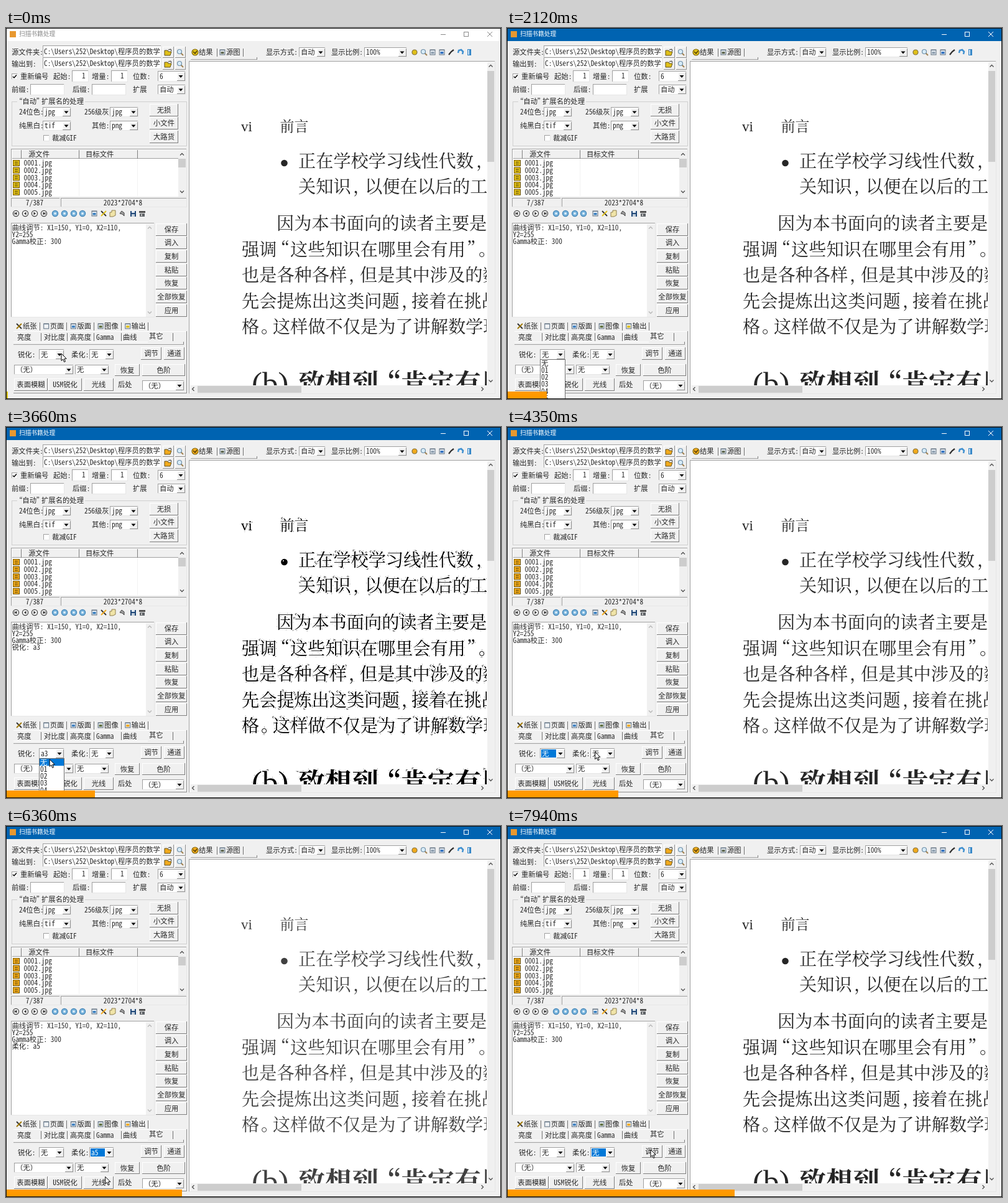
These frames come from a looping animation (796 px wide and 596 px high, 8000 ms). An HTML page with a canvas:

```html
<!DOCTYPE html>
<html lang="zh">
<head>
<meta charset="utf-8">
<style>
html, body { margin: 0; width: 100%; height: 100%; overflow: hidden; background: #f0f0f0; }
canvas { display: block; }
</style>
</head>
<body>
<canvas id="stage" width="796" height="596"></canvas>
<script>
const c = document.getElementById('stage').getContext('2d');
const UI = '"Noto Sans Mono CJK SC", "Noto Sans CJK SC", "Noto Sans CJK", monospace';
const BOOK = '"Noto Serif CJK SC", "Noto Sans CJK SC", "Noto Sans CJK", serif';
const LATIN = '"Liberation Serif", serif';
const LOOP = 8000, STEP = 69.4, ROW = 11.2, LIST_Y = 533;
const BLUE = '#0078d7', INK = '#262626';

// ---- primitives ----
function box(x, y, x2, y2, fill) {
  c.fillStyle = fill;
  c.fillRect(x, y, x2 - x, y2 - y);
}
// y is the vertical middle of the glyphs
function text(s, x, y, color = INK, size = 11.33, align = 'left') {
  c.font = `${size}px ${UI}`;
  c.textAlign = align;
  c.fillStyle = color;
  c.fillText(s, x, y + size * .37);
}
function path(points, stroke, width = 1, fill) {
  c.beginPath();
  points.forEach(([x, y], i) => i ? c.lineTo(x, y) : c.moveTo(x, y));
  if (fill) { c.closePath(); c.fillStyle = fill; c.fill(); }
  if (stroke) { c.strokeStyle = stroke; c.lineWidth = width; c.stroke(); }
}
function dot(x, y, r, fill, stroke) {
  c.beginPath();
  c.arc(x, y, r, 0, 7);
  if (fill) { c.fillStyle = fill; c.fill(); }
  if (stroke) { c.strokeStyle = stroke; c.lineWidth = 1.2; c.stroke(); }
}
function bevel(x, y, x2, y2, fill, light, dark) {
  box(x, y, x2, y2, dark);
  box(x, y, x2 - 1, y2 - 1, light);
  box(x + 1, y + 1, x2 - 1, y2 - 1, fill);
}
const sunken = (x, y, x2, y2, fill = '#fff') => bevel(x, y, x2, y2, fill, '#a0a0a0', '#e6e6e6');
function button(x, y, x2, y2, label) {
  bevel(x, y, x2, y2, '#f0f0f0', '#fff', '#808080');
  text(label, (x + x2) / 2, (y + y2) / 2, INK, 11.33, 'center');
}
function combo(x, y, x2, y2, label, marked) {
  sunken(x, y, x2, y2);
  bevel(x2 - 14, y + 2, x2 - 1, y2 - 1, '#f0f0f0', '#fff', '#909090');
  const ax = x2 - 8, ay = (y + y2) / 2;
  path([[ax - 3.5, ay - 1.5], [ax + 3.5, ay - 1.5], [ax, ay + 2.5]], null, 0, '#000');
  if (marked) box(x + 2, y + 2, x2 - 15, y2 - 2, BLUE);
  text(label, x + 3, ay, marked ? '#fff' : INK);
}
function check(x, y, on) {
  sunken(x, y, x + 10, y + 10);
  if (on) path([[x + 2, y + 5], [x + 4, y + 7], [x + 8, y + 2.5]], '#000', 1.5);
}
function chevron(x, y, dx, dy, color = '#505050') {
  path([[x - 3 * dy - 1.5 * dx, y - 3 * dx - 1.5 * dy], [x + 1.5 * dx, y + 1.5 * dy],
    [x + 3 * dy - 1.5 * dx, y + 3 * dx - 1.5 * dy]], color, 1.3);
}
function picture(x, y, color) {
  box(x - 4.5, y - 4.5, x + 4.5, y + 4.5, '#607080');
  box(x - 3.5, y - 3, x + 3.5, y + 3.5, '#e8eef4');
  box(x - 2.5, y - 1, x + 2.5, y + 2.5, color);
}
function lens(x, y) {
  path([[x + 1, y + 1], [x + 5, y + 5]], '#a08050', 2);
  dot(x - 1, y - 1, 3.5, '#d8ecf8', '#7090a8');
}
function cross(x, y, a, b) {
  path([[x - 4, y - 4], [x + 4, y + 4]], a, 1.8);
  path([[x + 4, y - 4], [x - 4, y + 4]], b, 1.8);
}

// ---- left panel ----
function settings(accent) {
  [['源文件夹:', 38], ['输出到:', 57]].forEach(([label, y]) => {
    text(label, 9, y + 1);
    sunken(59, y - 10, 250, y + 9);
    text('C:\\Users\\252\\Desktop\\程序员的数学', 61, y);
    bevel(252, y - 8, 270, y + 10, '#f0f0f0', '#fff', '#909090');
    path([[255, y + 6], [255, y - 2], [260, y - 2], [261, y], [266, y], [264, y + 6]], '#605020', 1, accent);
    path([[261, y - 3], [265, y - 4], [266, y - 1]], '#303030');
    bevel(272, y - 8, 289, y + 10, '#f0f0f0', '#fff', '#909090');
    lens(280, y + 1);
  });
  check(9, 73, true);
  text('重新编号', 23, 78);
  text('起始:', 76, 78);
  sunken(106, 68, 133, 87);
  text('1', 122, 77);
  text('增量:', 138, 78);
  sunken(169, 68, 196, 87);
  text('1', 184, 77);
  text('位数:', 204, 78);
  combo(244, 69, 289, 86, '6');
  text('前缀:', 9, 99);
  sunken(39, 90, 94, 108);
  text('后缀:', 107, 99);
  sunken(138, 90, 193, 108);
  text('扩展', 204, 99);
  combo(244, 91, 289, 107, '自动');

  c.strokeStyle = '#d0d0d0';
  c.lineWidth = 1;
  c.strokeRect(9.5, 118.5, 281, 71);
  box(18, 112, 127, 125, '#f0f0f0');
  text('“自动”', 15, 118);
  text('扩展名的处理', 57, 118);
  text('24位色:', 21, 135);
  combo(59, 127, 105, 143, 'jpg');
  text('256级灰', 126, 135);
  combo(167, 127, 213, 143, 'jpg');
  text('纯黑白:', 21, 157);
  combo(59, 149, 105, 165, 'tif');
  text('其他:', 138, 157);
  combo(167, 149, 213, 165, 'png');
  check(60, 172);
  text('裁减GIF', 74, 177);
  ['无损', '小文件', '大路货'].forEach((s, i) => button(231, 122 + 21.7 * i | 0, 277, 142 + 21.7 * i | 0, s));
}

function fileList(accent) {
  sunken(8, 194, 291, 272);
  box(10, 196, 277, 210, '#f0f0f0');
  box(10, 209, 277, 210, '#a0a0a0');
  [24, 117, 211].forEach(x => {
    box(x, 196, x + 1, 210, '#808080');
    if (x > 24) box(x, 210, x + 1, 270, '#f2f2f2');
  });
  text('源文件', 36, 203);
  text('目标文件', 128, 203);
  for (let i = 0; i < 5; i++) {
    const y = 217 + i * 11.7;
    bevel(11, y - 5, 22, y + 5, accent, '#806000', '#604800');
    box(14, y - 2, 19, y - 1, '#503c00');
    box(14, y + 1, 19, y + 2, '#503c00');
    text(`000${i + 1}.jpg`, 28.5, y);
  }
  box(277, 196, 290, 271, '#f0f0f0');
  box(277, 210, 289, 224, '#cdcdcd');
  chevron(283, 203, 0, -1);
  chevron(283, 263, 0, 1);
  sunken(8, 273, 87, 288, '#f0f0f0');
  sunken(88, 273, 291, 288, '#f0f0f0');
  text('7/387', 46, 281, INK, 11.33, 'center');
  text('2023*2704*8', 188, 281, INK, 11.33, 'center');
}

function toolbar(accent) {
  const y = 298;
  [16, 31, 46, 61].forEach((x, i) => {
    dot(x, y, 4.6, '#f4f4f4', '#404040');
    const d = i < 2 ? -1 : 1;
    path([[x - 1.5 * d, y - 2.5], [x - 1.5 * d, y + 2.5], [x + 2 * d, y]], null, 0, '#303030');
    if (i % 3 == 0) box(x + 2 * d - .5, y - 2, x + 2 * d + .5, y + 2, '#303030');
  });
  [79, 94, 109, 123].forEach(x => {
    dot(x, y, 4.6, '#7ab4dc', '#3c80b4');
    dot(x, y, 1.8, '#e4f2fa');
  });
  picture(142, y, '#3a80c0');
  cross(157, y, '#303030', accent);
  path([[167, 303], [167, 296], [170, 296], [170, 293], [176, 293], [176, 301], [172, 303]], '#908050', 1, '#f0e4a8');
  path([[183, 298], [186, 294], [190, 297], [190, 302], [187, 299]], '#404040', 1, '#a0a0a0');
  box(200, 294, 209, 303, '#204878');
  box(202, 294, 207, 297, '#e0e8f0');
  box(202, 299, 207, 303, '#c0ccd8');
  box(214, 294, 224, 297, '#505050');
  box(215, 298, 223, 303, '#606468');
  box(217, 299, 219, 302, '#c0c0c0');
}

function log(lastLine) {
  sunken(8, 313, 239, 465);
  box(225, 315, 238, 464, '#f0f0f0');
  chevron(231, 321, 0, -1, '#b8b8b8');
  chevron(231, 457, 0, 1, '#b8b8b8');
  ['曲线调节: X1=150, Y1=0, X2=110,', 'Y2=255', 'Gamma校正: 300', lastLine]
    .forEach((s, i) => text(s, 9.5, 321 + i * 10.8));
  ['保存', '调入', '复制', '粘贴', '恢复', '全部恢复', '应用']
    .forEach((s, i) => button(241, 314 + i * 21.7 | 0, 291, 334 + i * 21.7 | 0, s));
}

function adjustments(s, accent) {
  ['纸张', '页面', '版面', '图像', '输出'].forEach((label, i) => {
    const x = 21 + i * 43.7;
    if (i) picture(x, 479, ['', '#f4f4f4', '#4080c0', '#607040', accent][i]);
    else cross(x, 479, '#303030', '#a07800');
    text(label, x + 6, 479);
    box(54 + i * 43.7 | 0, 473, 55 + i * 43.7 | 0, 486, '#707070');
  });
  box(12, 487, 290, 488, '#fff');
  box(290, 487, 291, 586, '#909090');
  box(12, 586, 291, 587, '#909090');
  [['亮度', 18], ['对比度', 61], ['高亮度', 103], ['Gamma', 145], ['曲线', 188], ['其它', 230]]
    .forEach(([label, x], i) => text(label, x, i < 5 ? 497 : 495));
  [56, 98, 141, 185, 268].forEach(x => box(x, 490, x + 1, 503, '#707070'));
  box(12, 504, 228, 505, '#fff');
  box(285, 504, 286, 509, '#808080');
  box(12, 508, 286, 509, '#a0a0a0');

  text('锐化:', 19, 525);
  combo(53, 516, 94, 533, s.sharp, s.mark1);
  text('柔化:', 105, 525);
  combo(134, 516, 174, 533, s.soft, s.mark2);
  button(217, 513, 250, 533, '调节');
  button(254, 513, 287, 533, '通道');
  combo(13, 541, 109, 557, '（无）');
  combo(111, 541, 166, 557, '无');
  button(175, 540, 215, 559, '恢复');
  button(219, 540, 288, 559, '色阶');
  button(13, 563, 67, 583, '表面模糊');
  button(68, 563, 122, 583, 'USM锐化');
  button(125, 563, 173, 583, '光线');
  text('后处', 180, 573);
  combo(219, 566, 287, 583, '（无）');
}

// ---- right panel ----
const LINES = [
  ['vi', 378, 157, 23, LATIN], ['前言', 440.5, 157, 23],
  ['正在学校学习线性代数', 470, 214], ['，', 756, 214],
  ['关知识', 470, 255], ['，', 558, 255], ['以便在以后的工', 577, 255],
  ['因为本书面向的读者主要是', 435, 314],
  ['强调', 379, 356], ['“', 428, 356], ['这些知识在哪里会有用', 457, 356], ['”', 741, 356], ['。', 760, 356],
  ['也是各种各样', 379, 397], ['，', 551, 397], ['但是其中涉及的数', 569, 397],
  ['先会提炼出这类问题', 379, 439], ['，', 636, 439], ['接着在挑战', 652, 439],
  ['格', 379, 480], ['。', 410, 480], ['这样做不仅是为了讲解数学现', 429, 480],
  ['(b)', 395, 569, 51, LATIN], ['致想到', 470, 571, 43, BOOK, 'bold'],
  ['“', 593, 571, 43, BOOK, 'bold'], ['肯定有用', 635, 571, 43, BOOK, 'bold']
];
function page(view) {
  const sharp = view == 'sharp', soft = view == 'soft';
  c.save();
  c.beginPath();
  c.rect(296, 55, 477, 519);
  c.clip();
  if (soft) c.filter = 'blur(0.6px)';
  const ink = sharp ? '#000' : soft ? '#404040' : INK;
  c.textAlign = 'left';
  for (const [s, x, y, size = 28.2, font = BOOK, weight = ''] of LINES) {
    const base = y + size * .37;
    c.font = `${weight} ${size}px ${font}`;
    if (sharp) {
      // specks left by over-sharpening around each glyph
      c.setLineDash([.6, 11]);
      c.lineWidth = 5;
      c.strokeStyle = '#555';
      c.strokeText(s, x, base);
      c.setLineDash([]);
      c.lineWidth = 3;
      c.strokeStyle = '#fff';
      c.strokeText(s, x, base);
    }
    c.fillStyle = ink;
    c.fillText(s, x, base);
  }
  dot(447.5, 217, 5.3, ink);
  if (sharp) dot(446, 215, 1, '#fff');
  c.restore();
}

function preview(view, accent) {
  dot(304, 39, 5, accent, '#806810');
  path([[301, 38], [304, 41], [307, 37]], '#403000', 1.3);
  text('结果', 310, 39);
  picture(348, 39, '#606850');
  text('源图', 354, 39);
  [339, 381].forEach(x => box(x, 33, x + 1, 46, '#707070'));
  box(297, 47, 298, 52, '#fff');
  box(297, 50, 404, 51, '#a0a0a0');
  box(403, 47, 404, 51, '#808080');
  text('显示方式:', 418, 39);
  combo(471, 31, 514, 47, '自动');
  text('显示比例:', 523, 39);
  combo(576, 31, 645, 47, '100%');
  dot(657, 39, 4, accent, '#807040');
  lens(672, 39);
  picture(686, 39, '#90a0b0');
  picture(701, 39, '#3070c0');
  path([[712, 43], [716, 38], [720, 35]], '#303030', 2.2);
  path([[727, 40], [728, 36], [732, 35], [735, 38], [734, 42]], '#4090d0', 2.5);
  box(742, 34, 748, 44, '#3888c8');
  box(743, 35, 745, 43, '#c8e0f4');

  sunken(294, 53, 787, 588);
  box(774, 55, 786, 587, '#f0f0f0');
  box(296, 574, 786, 587, '#f0f0f0');
  box(774, 69, 785, 215, '#cdcdcd');
  box(308, 575, 475, 586, '#cdcdcd');
  chevron(779.5, 61, 0, -1);
  chevron(779.5, 567, 0, 1);
  chevron(301, 580, -1, 0);
  chevron(766, 580, 1, 0);
  page(view);
}

function titleBar(active) {
  box(0, 0, 796, 21, active ? '#0063b1' : '#fff');
  const ink = active ? '#fff' : '#8a8a8a';
  box(6, 5, 16, 15, '#e89830');
  text('扫描书籍处理', 21, 9.5, ink, 9.7);
  path([[699, 10.5], [707, 10.5]], ink);
  c.strokeStyle = ink;
  c.strokeRect(736.5, 6.5, 7, 7);
  path([[774, 6], [782, 14]], ink);
  path([[782, 6], [774, 14]], ink);
}

// ---- moving parts ----
const TRACK = [
  [0, 89, 523], [1000, 89, 523], [1210, 87, 523], [1350, 87, 523], [1750, 80, 600],
  [3000, 80, 600], [3250, 86, 524], [3420, 86, 524], [3650, 70, 534], [3900, 70, 534],
  [4350, 142, 522], [4550, 163, 522], [4750, 163, 522], [5050, 155, 600],
  [6200, 155, 600], [6500, 165, 522], [6850, 165, 522], [7150, 150, 533], [7450, 150, 533],
  [7900, 231, 520], [LOOP, 231, 520]
];
function pointer(t) {
  const i = TRACK.findIndex(k => k[0] > t);
  const [t0, x0, y0] = TRACK[i - 1], [t1, x1, y1] = TRACK[i];
  const u = (t - t0) / (t1 - t0), e = u * u * (3 - 2 * u);
  return [x0 + (x1 - x0) * e, y0 + (y1 - y0) * e];
}
function cursor([x, y]) {
  const shape = [[0, 0], [0, 11.5], [2.7, 9], [4.5, 13.5], [6.5, 12.7], [4.6, 8.4], [8.2, 8.2]];
  path([...shape, shape[0]].map(([a, b]) => [x + a, y + b]), '#000', 1, '#fff');
}
function dropdown(x, x2, chosen, y) {
  box(x, LIST_Y - 1, x2, 596, '#707070');
  box(x + 1, LIST_Y, x2 - 1, 596, '#fff');
  const hover = y > LIST_Y - .5 ? Math.floor((y - LIST_Y + 1) / ROW) : chosen;
  ['无', '01', '02', '03', '04', '05'].forEach((s, i) => {
    const top = LIST_Y + i * ROW;
    if (i == hover) box(x + 1, top, x2 - 1, top + ROW, BLUE);
    text(s, x + 2, top + ROW / 2, i == hover ? '#fff' : INK);
  });
}

function draw(step) {
  const t = step ? 1000 + (step - 1) * STEP : 0;
  const within = (a, b) => t >= a && t < b;
  const pos = pointer(t);
  const accent = t < 3520 ? '#e0c018' : '#f2aa1c';
  const view = within(2680, 4000) ? 'sharp' : within(5760, 7520) ? 'soft' : 'plain';

  box(0, 0, 796, 596, '#f0f0f0');
  titleBar(t >= 1060);
  settings(accent);
  fileList(accent);
  toolbar(accent);
  log({ sharp: '锐化: a3', soft: '柔化: a5', plain: '' }[view]);
  adjustments({
    sharp: within(2480, 3850) ? 'a3' : '无',
    soft: within(5480, 7380) ? 'a5' : '无',
    mark1: within(2480, 3420) || within(3850, 4600),
    mark2: within(5480, 6800) || t >= 7380
  }, accent);
  preview(view, accent);

  if (within(1130, 2480)) dropdown(53, 94, 0, pos[1]);
  if (within(3420, 3850)) dropdown(53, 94, 9, pos[1]);
  if (within(4650, 5480)) dropdown(134, 175, 0, pos[1]);
  if (within(6800, 7380)) dropdown(134, 175, 9, pos[1]);
  cursor(pos);

  c.strokeStyle = '#101010';
  c.lineWidth = 1;
  c.strokeRect(.5, .5, 795, 595);
  box(1, 584, Math.round(3 + 3.59 * step), 595, t < 1840 ? '#dcc410' : '#ff9900');
}

let shown = -1;
function tick(now) {
  const t = now % LOOP;
  const step = t < 1000 ? 0 : Math.min(101, Math.floor((t - 1000) / STEP) + 1);
  if (step != shown) draw(shown = step);
  requestAnimationFrame(tick);
}
tick(performance.now());
</script>
</body>
</html>
```
